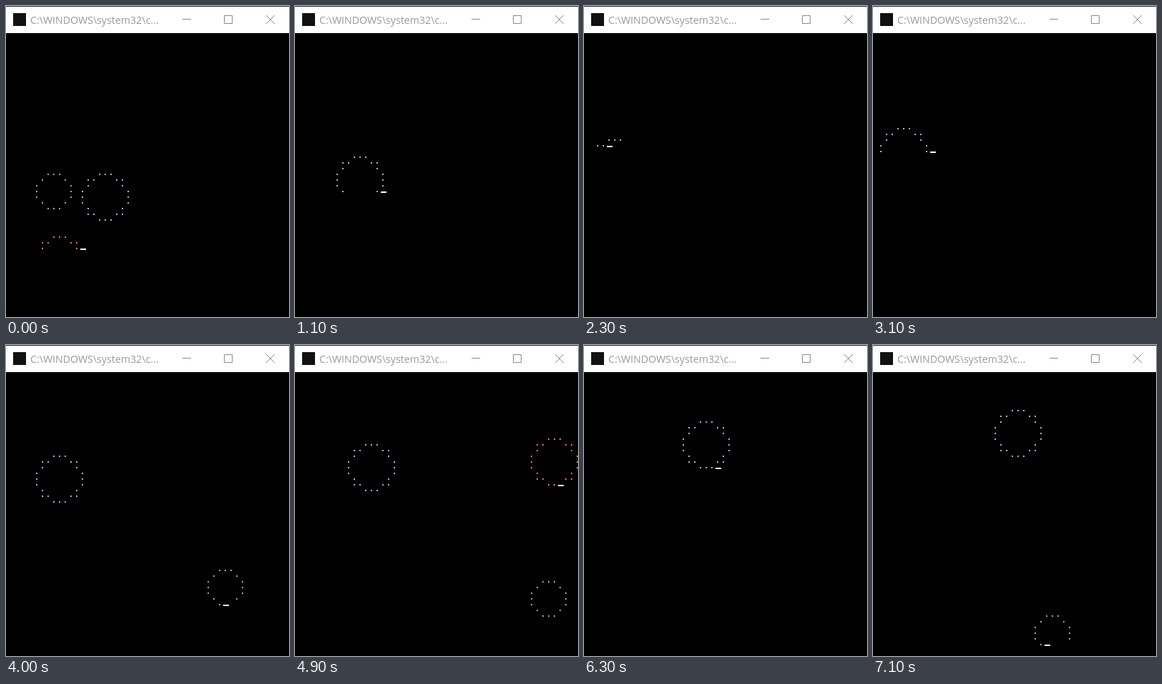
Recreate the animation shown at these times as an HTML page. Size 396 by 436 pixels, loop 7200 ms.

```html
<!DOCTYPE html>
<html lang="en">
<head>
<meta charset="utf-8">
<title>Console</title>
<style>
html, body { margin: 0; width: 100%; height: 100%; overflow: hidden; background: #000; }
svg { display: block; width: 396px; height: 436px; }
text { font: 14.2px "Open Sans", "Noto Sans", sans-serif; fill: #999; }
</style>
</head>
<body>
<svg viewBox="0 0 396 436">
  <rect width="396" height="436"/>
  <rect width="396" height="38" fill="#fff"/>
  <rect width="396" height="1" fill="#1d2b38"/>
  <rect x="10" y="10" width="18" height="18" fill="#111"/>
  <text x="34" y="25">C:\WINDOWS\system32\c...</text>
  <g fill="none" stroke="#8a8a8a">
    <path d="M247 18.5H259"/>
    <path d="M305.5 13.5H316.5V24.5H305.5Z"/>
    <path d="M364 13L376 25M376 13L364 25"/>
  </g>
  <g id="screen" shape-rendering="crispEdges"></g>
</svg>
<script>
const LOOP = 7200, TICK = 100, CELL = 8, TOP = 38, COLS = 50;
const CYCLE = 88; // dots per redraw, counting the pause at its end
// [ms, dots printed so far]
const PACE = [[0, 49], [1100, 281], [2300, 533], [3100, 717],
              [4900, 1119], [6300, 1432], [7100, 1620]];
// Columns count from 1, rows from 0.
const BALLS = [
  { r: 4, x: 18, y: 28, dx: -2, dy: -1, color: "#a9b4c9" },
  { r: 3, x: 9, y: 27, dx: 3, dy: 1, color: "#9ba6a6" },
  { r: 4, x: 10, y: 39, dx: 3, dy: -2, color: "#e5725c" }
];

const screen = document.getElementById("screen");
function addPath(color) {
  const path = document.createElementNS("http://www.w3.org/2000/svg", "path");
  path.setAttribute("fill", color);
  return screen.appendChild(path);
}

function ring(r) {
  const dots = [];
  for (let y = -r; y <= r; y++)
    for (let x = -r; x <= r; x++)
      if (Math.abs(x * x + y * y - r * r) < 4) dots.push([x, y]);
  return dots;
}

for (const ball of BALLS) {
  ball.dots = ring(ball.r);
  ball.path = addPath(ball.color);
}
const cursor = addPath("#fff");

function center(ball, steps) {
  let { x, dx } = ball;
  for (let i = 0; i < steps; i++) {
    x = Math.max(ball.r, Math.min(COLS - ball.r, x + dx));
    if (x === ball.r || x === COLS - ball.r) dx = -dx;
  }
  return [x - 1, ball.y + ball.dy * steps];
}

function printed(t) {
  let i = 1;
  while (i < PACE.length - 1 && t > PACE[i][0]) i++;
  const [t0, n0] = PACE[i - 1], [t1, n1] = PACE[i];
  return Math.round(n0 + (n1 - n0) * (t - t0) / (t1 - t0));
}

const box = (x, y, w, h) => `M${x} ${y}h${w}v${h}h${-w}z`;

function draw(t) {
  const count = printed(t);
  const steps = Math.floor(count / CYCLE);
  let left = count % CYCLE, cursorBox = "";
  for (const ball of BALLS) {
    const [cx, cy] = center(ball, steps);
    let d = "";
    for (const [x, y] of ball.dots.slice(0, left)) {
      const px = (cx + x) * CELL, py = TOP + (cy + y) * CELL;
      if (px >= 0) d += box(px + 2, py + 5, 2, 2);
      cursorBox = box(px + CELL, py + 6, CELL, 2);
    }
    left = Math.max(0, left - ball.dots.length);
    ball.path.setAttribute("d", d);
  }
  cursor.setAttribute("d", cursorBox);
}

function frame() {
  const t = performance.now() % LOOP;
  draw(Math.floor(t / TICK) * TICK);
  requestAnimationFrame(frame);
}
frame();
</script>
</body>
</html>
```
